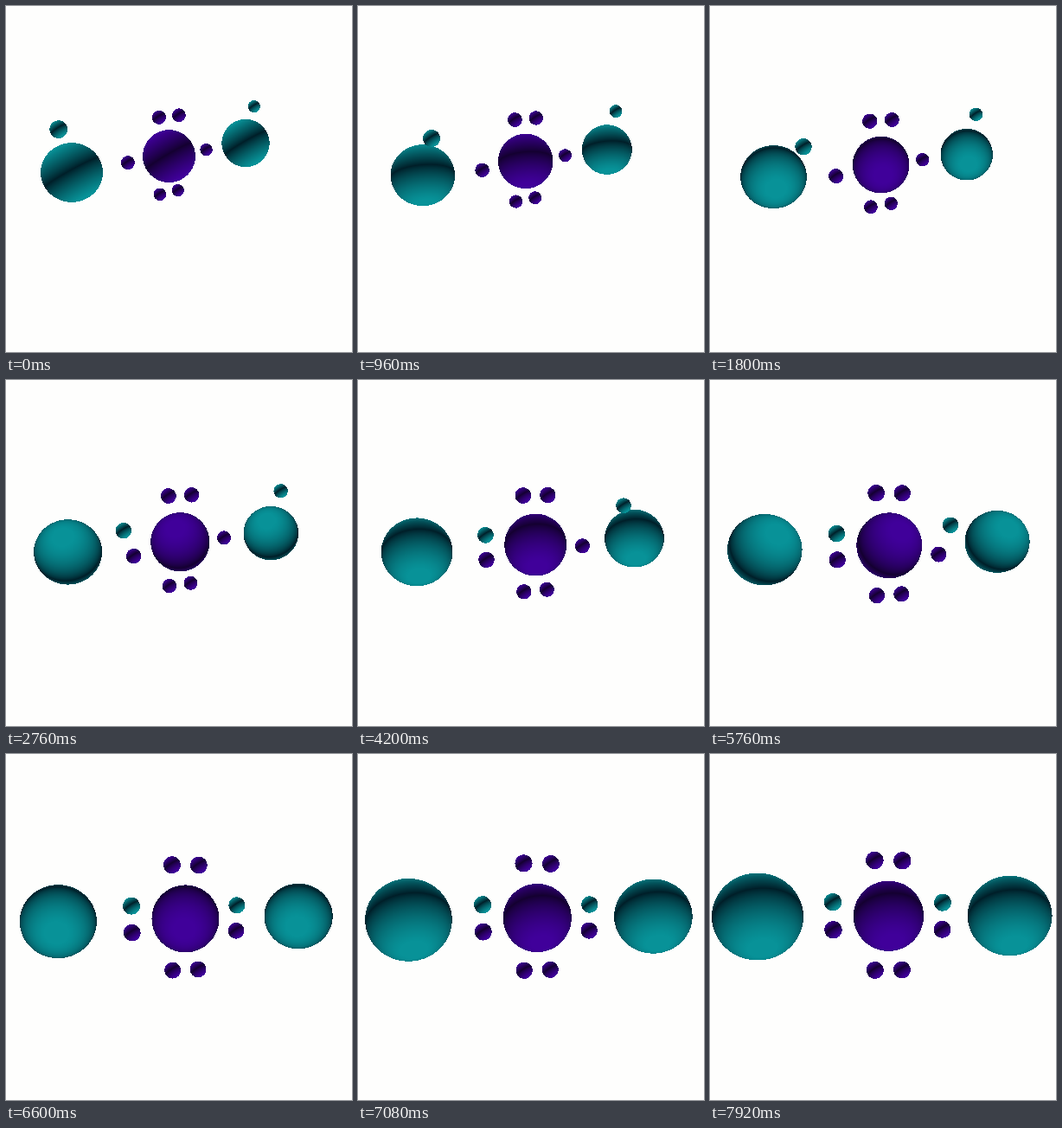
Write an HTML page with a canvas that moves like this. It is 400 by 400 pixels and loops after 8 s.

```html
<!DOCTYPE html>
<html lang="en">
<head>
<meta charset="utf-8">
<title>Orbiting spheres</title>
<style>
  html, body { margin: 0; width: 100%; height: 100%; overflow: hidden; background: #fefefd; }
  canvas { display: block; width: 400px; height: 400px; }
</style>
</head>
<body>
<canvas id="stage" width="400" height="400"></canvas>
<script>
const SIZE = 400, LOOP = 8000, STEP = 120, END = 7920;
const ctx = document.getElementById('stage').getContext('2d');
const image = ctx.createImageData(SIZE, SIZE);
const pixels = new Uint32Array(image.data.buffer);

const TEAL = { dark: [0, 30, 40], bright: [8, 146, 152] };
const PURPLE = { dark: [20, 0, 48], bright: [64, 0, 154] };

// Each body glides along a parabola: start, middle and end as x, y, radius
const LEFT = [[76, 192.5, 36], [68.7, 199, 41], [55, 188, 45.9]];
const RIGHT = [[277, 158.5, 27.6], [317.4, 182.3, 33.9], [346.6, 187, 42.4]];
const CENTER = [[188.5, 173.6, 30.4], [204.7, 190.2, 35.6], [206.4, 187.3, 40.6]];
const RING = [[45.3], [56.2], [65.2]];

// Turning light: time, tilt and elevation in degrees
const LIGHT = [[0, 30, 5], [960, 5, 20], [2760, 18, 120], [4200, 5, 42],
  [5760, -38, 125], [7080, 10, 40], [LOOP, 8, 40]];
const SMALL_LIGHT = [.53, .82, .2];

const RING_SPREAD = 14, TRAVEL = 3140;
const rad = degrees => degrees * Math.PI / 180;
const clamp = v => Math.max(0, Math.min(1, v));
const mix = (a, b, u) => a.map((v, k) => v + (b[k] - v) * u);

function glide([start, middle, end], u) {
  return start.map((v, k) =>
    v * (1 - u) * (1 - 2 * u) + middle[k] * 4 * u * (1 - u) + end[k] * u * (2 * u - 1));
}

function lightAt(t) {
  const i = LIGHT.findIndex(key => key[0] > t);
  const from = LIGHT[i - 1], to = LIGHT[i];
  const [, tilt, rise] = mix(from, to, (t - from[0]) / (to[0] - from[0])).map(rad);
  return [Math.sin(tilt) * Math.cos(rise), Math.cos(tilt) * Math.cos(rise), Math.sin(rise)];
}

// Both sides of the sphere are lit, leaving a dark great circle between them
function sphere([cx, cy, rx], squash, { dark, bright }, light) {
  const ry = rx * squash;
  const right = Math.min(SIZE, cx + rx), bottom = Math.min(SIZE, cy + ry);
  for (let py = Math.max(0, Math.floor(cy - ry)); py < bottom; py++) {
    for (let px = Math.max(0, Math.floor(cx - rx)); px < right; px++) {
      const x = (px + .5 - cx) / rx, y = (py + .5 - cy) / ry;
      const depth = 1 - x * x - y * y;
      if (depth < 0) continue;
      const dot = x * light[0] + y * light[1] + Math.sqrt(depth) * light[2];
      const [r, g, b] = mix(dark, bright, Math.min(1, Math.abs(dot) ** .85 * 1.05));
      pixels[py * SIZE + px] = 0xff000000 | b << 16 | g << 8 | r;
    }
  }
}

function draw(t) {
  pixels.fill(0xfffdfefe);
  const u = t / END;
  const left = glide(LEFT, u), right = glide(RIGHT, u), center = glide(CENTER, u);
  const [ring] = glide(RING, u);
  const slant = -.165 * (1 - u) ** 1.4;
  const perspective = .05 * (1 - .7 * u * u);

  // A place on the tilted ring around the central sphere
  const slot = degrees => {
    const x = Math.cos(rad(degrees)), y = Math.sin(rad(degrees));
    const near = 1 - perspective * (x + y);
    return [center[0] + ring * x * near, center[1] + ring * (y * near + x * slant),
      center[2] * .247 * near];
  };
  const home = ([x, y, r], dx, dy, size) => [x + dx * r, y + dy * r, size * r];

  const leftTrip = clamp(t / TRAVEL), rightTrip = clamp((t - TRAVEL) / TRAVEL);
  const leftMoon = mix(home(left, -.425, -1.386, .287), slot(180 + RING_SPREAD), leftTrip);
  const rightMoon = mix(home(right, .355, -1.535, .256), slot(-RING_SPREAD), rightTrip);

  const beat = clamp(1 - Math.abs(t - 7560) / 1080);
  const pulse = 1 + .205 * Math.sin(beat * Math.PI / 2) ** 2;
  left[2] *= pulse;
  right[2] *= pulse;

  const light = lightAt(t);
  sphere(left, .953, TEAL, light);
  sphere(right, 1 - .055 * u, TEAL, light);
  sphere(center, 1, PURPLE, light);

  // The side satellites make room while a moon joins the ring
  const angles = [RING_SPREAD * rightTrip, 180 - RING_SPREAD * leftTrip];
  for (const axis of [-90, 90]) angles.push(axis - RING_SPREAD, axis + RING_SPREAD);
  for (const angle of angles) sphere(slot(angle), 1, PURPLE, SMALL_LIGHT);
  for (const moon of [leftMoon, rightMoon]) sphere(moon, 1, TEAL, SMALL_LIGHT);

  ctx.putImageData(image, 0, 0);
}

function tick() {
  draw(Math.floor(performance.now() % LOOP / STEP) * STEP);
  requestAnimationFrame(tick);
}
tick();
</script>
</body>
</html>
```
